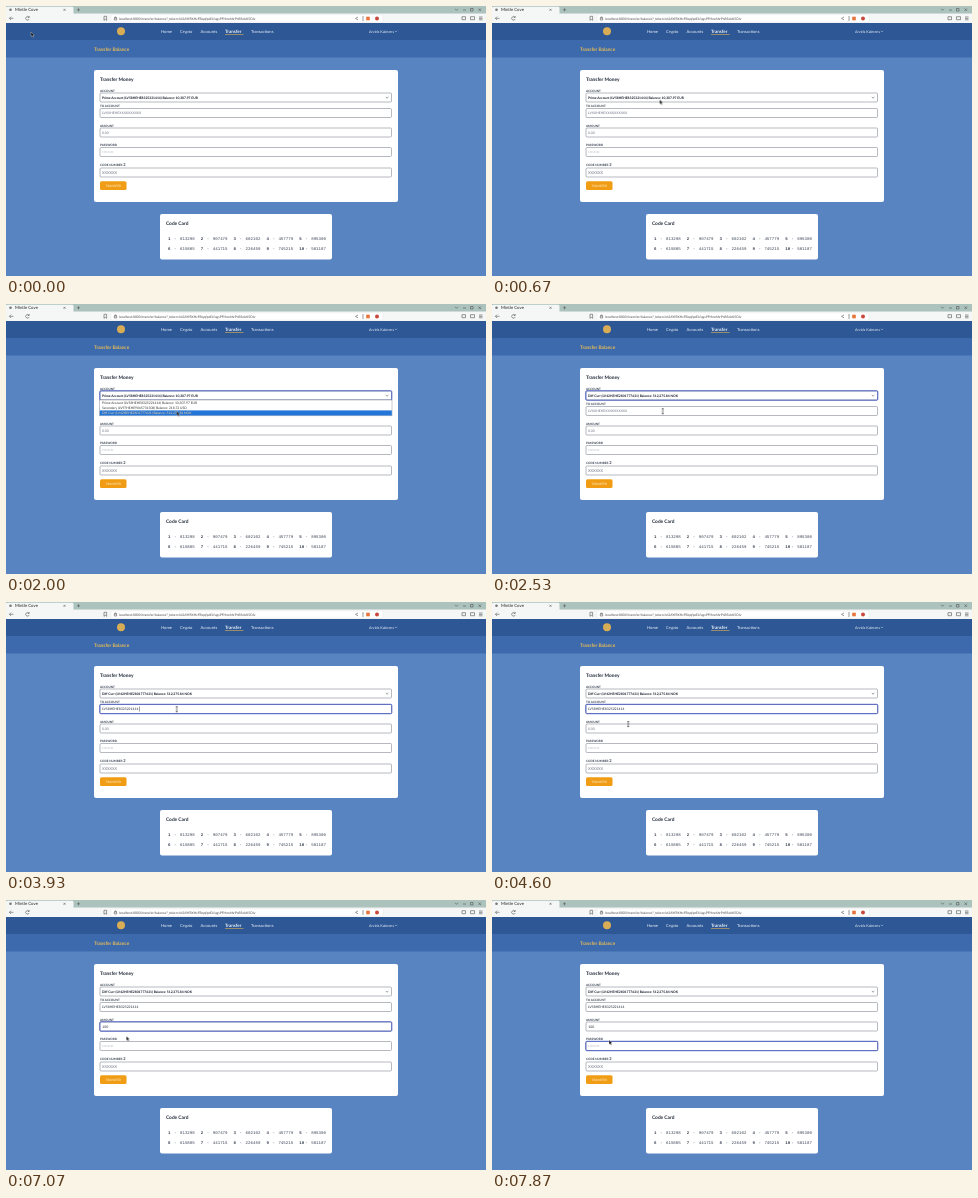
An HTML page that plays this animation: 480x270 px, repeating every 8000 ms.

```html
<!DOCTYPE html>
<html lang="en">
<head>
<meta charset="utf-8">
<title>Transfer Balance</title>
<style>
html, body { margin: 0; width: 100%; height: 100%; overflow: hidden; background: #5885c1; }
svg { display: block; width: 100vw; height: 100vh; font-family: Lato, "Open Sans", sans-serif; text-rendering: geometricPrecision; }
.bold { font-weight: 700; }
.heading { font-size: 4.8px; font-weight: 700; fill: #1f2937; }
.label { font-size: 3.05px; font-weight: 700; fill: #374151; }
.value { font-size: 3.4px; fill: #1f2937; }
.choice { font-size: 3.3px; font-weight: 700; fill: #111827; }
.option { font-size: 3.3px; fill: #333; }
.hint { font-size: 3.4px; fill: #6b7280; }
.nav { font-size: 4.1px; fill: #eef3fa; }
.field { fill: #fff; stroke: #858b96; stroke-width: .6; }
.focus { fill: none; stroke: #4c5fc4; stroke-width: 1; }
.caret { stroke: #111; stroke-width: .5; }
.icon { fill: none; stroke: #555; stroke-width: .6; }
.codes { font: 4.1px "Liberation Mono", monospace; fill: #374151; }

/* Timed parts: 1% is 80 ms */
.t { opacity: 0; animation: 8s step-end infinite; }
.from { opacity: 1; animation: 8s step-end infinite; }
.accountFocus { animation-name: accountFocus; }
.menu { animation-name: menu; }
.pick1 { animation-name: pick1; }
.pick2 { animation-name: pick2; }
.pick3 { animation-name: pick3; }
.prime { animation-name: prime; }
.diff { animation-name: diff; }
.toFocus { animation-name: toFocus; }
.toHint { animation-name: toHint; }
.toValue { animation-name: toValue; }
.toCaret1 { animation-name: toCaret1; }
.toCaret2 { animation-name: toCaret2; }
.amountFocus { animation-name: amountFocus; }
.amountHint { animation-name: amountHint; }
.amountCaret { animation-name: amountCaret; }
.digit1 { animation-name: digit1; }
.digit2 { animation-name: digit2; }
.digit3 { animation-name: digit3; }
.suggest { animation-name: suggest; }
.passwordFocus { animation-name: passwordFocus; }
.passwordCaret { animation-name: passwordCaret; }
.beam { animation-name: beam; }
.arrow { animation-name: arrow; }
.pointer { animation: pointer 8s infinite; }

@keyframes accountFocus { 17.45% { opacity: 1 } 39.95% { opacity: 0 } }
@keyframes menu { 17.45% { opacity: 1 } 29.1% { opacity: 0 } }
@keyframes pick1 { 17.45% { opacity: 1 } 20.8% { opacity: 0 } }
@keyframes pick2 { 20.8% { opacity: 1 } 23.3% { opacity: 0 } }
@keyframes pick3 { 23.3% { opacity: 1 } 29.1% { opacity: 0 } }
@keyframes prime { 29.1% { opacity: 0 } to { opacity: 0 } }
@keyframes diff { 29.1%, to { opacity: 1 } }
@keyframes toFocus { 39.95% { opacity: 1 } 59.1% { opacity: 0 } }
@keyframes toHint { 44.1%, to { opacity: 0 } }
@keyframes toValue { 44.1%, to { opacity: 1 } }
@keyframes toCaret1 { 39.95% { opacity: 1 } 44.1% { opacity: 0 } }
@keyframes toCaret2 { 44.1% { opacity: 1 } 53.3% { opacity: 0 } }
@keyframes amountFocus { 59.1% { opacity: 1 } 89.1% { opacity: 0 } }
@keyframes amountHint { 70.85%, to { opacity: 0 } }
@keyframes digit1 { 70.85%, to { opacity: 1 } }
@keyframes digit2 { 74.1%, to { opacity: 1 } }
@keyframes digit3 { 75.8%, to { opacity: 1 } }
@keyframes amountCaret {
  59.1% { opacity: 1; transform: none }
  66.6% { opacity: 0; transform: none }
  70.85% { opacity: 1; transform: translateX(2px) }
  74.1% { opacity: 1; transform: translateX(4px) }
  75.8% { opacity: 1; transform: translateX(6px) }
  83.3%, to { opacity: 0; transform: translateX(6px) }
}
@keyframes suggest { 71.6% { opacity: .6 } 72.4% { opacity: .3 } 73.3% { opacity: .12 } 74.1% { opacity: 0 } }
@keyframes passwordFocus { 90.85%, to { opacity: 1 } }
@keyframes passwordCaret { 90.85% { opacity: 1 } 98.3% { opacity: 0 } }
@keyframes beam { 29.95% { opacity: 1 } 88.3% { opacity: 0 } }
@keyframes arrow { 29.95% { opacity: 0 } 88.3%, to { opacity: 1 } }
@keyframes pointer {
  0% { transform: translate(25px, 26px); animation-timing-function: step-end }
  .8% { transform: translate(25px, 26px); animation-timing-function: steps(4, jump-start) }
  4.15% { transform: translate(167px, 97px); animation-timing-function: step-end }
  5.8% { transform: translate(167px, 97px); animation-timing-function: steps(7, jump-start) }
  11.65% { transform: translate(168px, 91px); animation-timing-function: step-end }
  17.45% { transform: translate(168px, 91px); animation-timing-function: steps(9, jump-start) }
  24.95% { transform: translate(170.7px, 107.2px); animation-timing-function: step-end }
  53.3% { transform: translate(170.7px, 107.2px); animation-timing-function: steps(7, jump-start) }
  59.1% { transform: translate(130.5px, 124.6px); animation-timing-function: step-end }
  86.6% { transform: translate(130.5px, 124.6px); animation-timing-function: steps(4, jump-start) }
  89.9% { transform: translate(117px, 140px); animation-timing-function: step-end }
  to { transform: translate(117px, 140px) }
}
</style>
</head>
<body>
<svg viewBox="0 0 480 270" preserveAspectRatio="none">
  <!-- Browser bars -->
  <rect width="480" height="8" fill="#abc2bd"/>
  <path d="M0 8V2Q0 .7 1.5 .7H66Q67.500 .7 67.500 2V8Z" fill="#f5f6f6"/>
  <circle cx="4.500" cy="3.800" r="1.300" fill="#777"/>
  <text x="9" y="5.200" font-size="4.300" fill="#222">Mintle Cove</text>
  <path class="icon" d="M57.500 2.800l2 2m0-2l-2 2M64.500 3.800h0M71 3.800h3m-1.500-1.500v3M449 2.800l1.500 1.500 1.500-1.500M457 4h3M464.500 2.500h2.500v2.500h-2.500zM472.500 2.500l2.500 2.500m0-2.500l-2.500 2.500"/>
  <rect y="7.500" width="480" height="9.700" fill="#f5f6f6"/>
  <rect x="105" y="8.800" width="272" height="7.200" rx="1" fill="#fff" stroke="#e3e5e5" stroke-width=".4"/>
  <path class="icon" d="M7.500 12.300h-4m1.600-1.700l-1.700 1.700 1.700 1.700M23 11.300a1.800 1.800 0 1 0 .2 1.700M23.200 10v1.500h-1.500M98 10.300h2.600v4l-1.300-1-1.300 1zM108.300 12h2.400v2h-2.400zM108.800 12v-1h1.400v1M352 11l-2.500 1.400 2.500 1.400M357 10v5M456 10.700h3.500v3h-3.500zM464.500 10.700h4v3h-4zM473 11h3.500m-3.500 1.400h3.500m-3.500 1.400h3.500"/>
  <text x="113" y="13.700" font-size="3.350" fill="#444">localhost:8000/transfer/balance?_token=kt2AYfRXHcFBqqfpzELfugsPFHnehhrPnR5okK5DIv</text>
  <rect x="360.200" y="10.700" width="3.600" height="3.600" fill="#e8743b"/>
  <circle cx="371" cy="12.400" r="2" fill="#c8483b"/>

  <!-- Site header -->
  <rect y="17" width="480" height="17" fill="#2d5795"/>
  <rect y="34" width="480" height="17.500" fill="#3d6aac"/>
  <circle cx="115" cy="25.300" r="4" fill="#d9ad55"/>
  <g class="nav">
    <text x="155" y="27">Home</text>
    <text x="174" y="27">Crypto</text>
    <text x="194.500" y="27">Accounts</text>
    <text x="219" y="27" font-size="4.500" class="bold">Transfer</text>
    <text x="245" y="27">Transactions</text>
    <text x="363" y="26.500" font-size="3.700">Arvids Kalmens</text>
  </g>
  <path d="M219 28.500h18.500" stroke="#e0b050" stroke-width=".6"/>
  <path d="M389 24.800l1 1 1-1" fill="none" stroke="#eef3fa" stroke-width=".5"/>
  <text x="88" y="44.500" font-size="4.800" class="bold" fill="#e8bc55">Transfer Balance</text>

  <!-- Transfer form -->
  <rect x="88" y="64" width="304" height="132" rx="2" fill="#fff"/>
  <text x="94" y="74.600" class="heading">Transfer Money</text>
  <g class="label">
    <text x="94" y="85.900">ACCOUNT</text>
    <text x="94" y="101.200">TO ACCOUNT</text>
    <text x="94" y="120.900">AMOUNT</text>
    <text x="94" y="140.300">PASSWORD</text>
    <text x="94" y="160.300">CODE NUMBER <tspan font-size="4">2</tspan></text>
  </g>
  <g class="field">
    <rect x="94" y="87" width="291.500" height="9" rx="1"/>
    <rect x="94" y="102.500" width="291.500" height="9" rx="1"/>
    <rect x="94" y="122" width="291.500" height="9" rx="1"/>
    <rect x="94" y="141.500" width="291.500" height="9" rx="1"/>
    <rect x="94" y="162" width="291.500" height="9" rx="1"/>
  </g>
  <path class="icon" d="M379.800 91l1.300 1.200 1.300-1.200"/>
  <g class="choice">
    <text x="96" y="92.600" class="from prime">Prime Account (LV58HEHE8325221414) Balance: 10,307.97 EUR</text>
    <text x="96" y="92.600" class="t diff">Diff Curr (LV42HEHE2801777621) Balance: 512,275.84 NOK</text>
  </g>
  <text x="96" y="108.100" class="hint from toHint">LVXXHEHEXXXXXXXXXX</text>
  <text x="96" y="108.100" class="value t toValue">LV58HEHE8325221414</text>
  <text x="96" y="127.700" class="hint from amountHint">0.00</text>
  <g class="value">
    <text x="96.200" y="127.700" class="t digit1">1</text>
    <text x="98.200" y="127.700" class="t digit2">0</text>
    <text x="100.200" y="127.700" class="t digit3">0</text>
  </g>
  <text x="96" y="147.600" class="hint" font-size="4">********</text>
  <text x="96" y="167.800" class="hint" style="font-size:3.900px">XXXXXX</text>
  <rect x="94" y="175.300" width="26.500" height="8.700" rx="1.500" fill="#f09d15"/>
  <text x="107.250" y="180.700" font-size="3.100" text-anchor="middle" fill="#fff3d9">TRANSFER</text>

  <g class="focus">
    <rect x="93.800" y="86.800" width="292" height="9.400" rx="1" class="t accountFocus"/>
    <rect x="93.800" y="102.300" width="292" height="9.400" rx="1" class="t toFocus"/>
    <rect x="93.800" y="121.800" width="292" height="9.400" rx="1" class="t amountFocus"/>
    <rect x="93.800" y="141.300" width="292" height="9.400" rx="1" class="t passwordFocus"/>
  </g>
  <g class="caret">
    <path d="M96.300 104.500v5" class="t toCaret1"/>
    <path d="M133.300 104.500v5" class="t toCaret2"/>
    <path d="M96.500 124v5" class="t amountCaret"/>
    <path d="M96.300 143.600v5" class="t passwordCaret"/>
  </g>

  <g class="t suggest">
    <rect x="95" y="132" width="36" height="41" rx="1" fill="#fff" stroke="#ccc" stroke-width=".5"/>
    <path d="M122 140h2m-2 9h2m-2 8h3" stroke="#999" stroke-width=".8"/>
  </g>

  <g class="t menu">
    <rect x="93.500" y="96" width="292.500" height="15.800" fill="#fff" stroke="#8d929c" stroke-width=".5"/>
    <g fill="#2376d8">
      <rect x="93.800" y="96.300" width="292" height="5" class="t pick1"/>
      <rect x="93.800" y="101.300" width="292" height="5" class="t pick2"/>
      <rect x="93.800" y="106.400" width="292" height="5.100" class="t pick3"/>
    </g>
    <g class="option">
      <text x="96" y="100">Prime Account (LV58HEHE8325221414) Balance: 10,307.97 EUR</text>
      <text x="96" y="105">Secondary (LV97HEHE9065731308) Balance: 218.72 USD</text>
      <text x="96" y="110.100">Diff Curr (LV42HEHE2801777621) Balance: 512,275.84 NOK</text>
    </g>
    <g class="option" style="fill:#fff">
      <text x="96" y="100" class="t pick1" fill="#fff">Prime Account (LV58HEHE8325221414) Balance: 10,307.97 EUR</text>
      <text x="96" y="105" class="t pick2" fill="#fff">Secondary (LV97HEHE9065731308) Balance: 218.72 USD</text>
      <text x="96" y="110.100" class="t pick3" fill="#fff">Diff Curr (LV42HEHE2801777621) Balance: 512,275.84 NOK</text>
    </g>
  </g>

  <!-- Code card -->
  <rect x="154" y="208" width="172" height="45.500" rx="2" fill="#fff"/>
  <text x="160" y="218.900" class="heading">Code Card</text>
  <g class="codes" id="codes"></g>

  <g class="pointer">
    <path class="from arrow" d="M0 0V4.500L1.100 3.600 1.900 5.300 2.700 4.900 1.900 3.300H3.300Z" fill="#111" stroke="#fff" stroke-width=".3"/>
    <path class="t beam" d="M-1-2.500H1M0-2.500V2.500M-1 2.500H1" fill="none" stroke="#222" stroke-width=".6"/>
  </g>
</svg>
<script>
const codes = "813298 907479 602102 457779 895300 615805 441715 226459 745215 501187".split(" ");
document.getElementById("codes").innerHTML = codes.map((code, i) => {
  const x = 162 + (i % 5) * 32.8;
  const y = i < 5 ? 233.7 : 243.7;
  return `<text x="${x}" y="${y}" class="bold">${i + 1}</text>
    <text x="${x + 6}" y="${y}">-</text><text x="${x + 12}" y="${y}">${code}</text>`;
}).join("");
</script>
</body>
</html>
```
